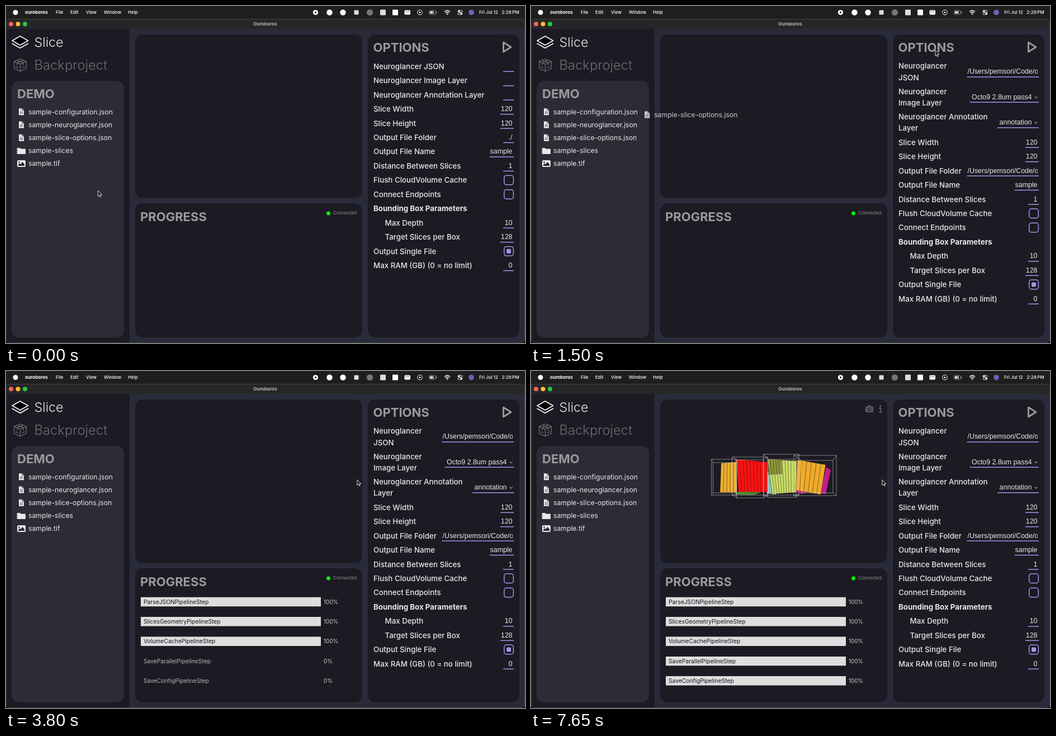
An HTML page with a canvas for the animation above (7790 ms loop, 928x603 px).

```html
<!DOCTYPE html>
<html lang="en">
<head>
<meta charset="utf-8">
<title>Ouroboros</title>
<style>
html, body { margin: 0; width: 100%; height: 100%; overflow: hidden; background: #000; }
canvas { display: block; }
</style>
</head>
<body>
<canvas id="stage" width="928" height="603"></canvas>
<script>
const ctx = document.getElementById('stage').getContext('2d');
const LOOP = 7790, STEP = 100;
const BAR = '#1e1e1f', PANEL = '#1c1a23', WHITE = '#e9e9ea', GREY = '#9a9a9c', PURPLE = '#9d97ea';
const SANS = 'Inter, sans-serif', ARIAL = '"Liberation Sans", Arial, sans-serif';
const FILES = ['sample-configuration.json', 'sample-neuroglancer.json',
  'sample-slice-options.json', 'sample-slices', 'sample.tif'];
const STEPS = ['ParseJSON', 'SlicesGeometry', 'VolumeCache', 'SaveParallel', 'SaveConfig'];
const FOLDER = '/Users/pemsori/Code/o';

// label (| marks the wrap), value, value once the options are loaded
const OPTIONS = [
  ['Neuroglancer|JSON', '', FOLDER],
  ['Neuroglancer|Image Layer', '', 'Octo9 2.8um pass4'],
  ['Neuroglancer Annotation|Layer', '', 'annotation'],
  ['Slice Width', '120'],
  ['Slice Height', '120'],
  ['Output File Folder', './', FOLDER],
  ['Output File Name', 'sample'],
  ['Distance Between Slices', '1'],
  ['Flush CloudVolume Cache', false],
  ['Connect Endpoints', false],
  ['Bounding Box Parameters', null],
  ['Max Depth', '10'],
  ['Target Slices per Box', '128'],
  ['Output Single File', true],
  ['Max RAM (GB) (0 = no limit)', '0'],
];

// y is the middle of the capitals
function text(s, x, y, size, { weight = 400, color = WHITE, font = SANS, align = 'left' } = {}) {
  ctx.font = `${weight} ${size}px ${font}`;
  ctx.textAlign = align;
  ctx.fillStyle = color;
  ctx.fillText(s, x, y + size * 0.36);
}
function rect(x, y, w, h, color, radius = 0) {
  ctx.fillStyle = color;
  ctx.beginPath();
  ctx.roundRect(x, y, w, h, radius);
  ctx.fill();
}
function outline(x, y, w, h, color, radius, width) {
  ctx.strokeStyle = color;
  ctx.lineWidth = width;
  ctx.beginPath();
  ctx.roundRect(x, y, w, h, radius);
  ctx.stroke();
}
function dot(x, y, r, color) {
  ctx.fillStyle = color;
  ctx.beginPath();
  ctx.arc(x, y, r, 0, 7);
  ctx.fill();
}
function ring(x, y, r, color, width) {
  ctx.strokeStyle = color;
  ctx.lineWidth = width;
  ctx.beginPath();
  ctx.arc(x, y, r, 0, 7);
  ctx.stroke();
}
function shape(d, x, y, { fill, stroke, width = 1 }) {
  const path = new Path2D(d);
  ctx.save();
  ctx.translate(x, y);
  ctx.lineJoin = ctx.lineCap = 'round';
  if (fill) { ctx.fillStyle = fill; ctx.fill(path); }
  if (stroke) { ctx.strokeStyle = stroke; ctx.lineWidth = width; ctx.stroke(path); }
  ctx.restore();
}

function drawMenuBar() {
  rect(0, 0, 928, 30, BAR);
  dot(17, 11.5, 4.5, '#fff');
  text('ouroboros', 34, 11, 8.1, { weight: 700, color: '#fff' });
  [['File', 89], ['Edit', 115], ['View', 143], ['Window', 175], ['Help', 218]]
    .forEach(([s, x]) => text(s, x, 11, 8, { weight: 500, color: '#fff' }));
  text('Fri Jul 12', 846, 11, 8, { weight: 500, color: '#fff' });
  text('2:28\u2009PM', 917.5, 11, 8, { weight: 500, color: '#fff', align: 'right' });

  dot(553.5, 11.5, 4.6, '#fff');
  rect(552, 10, 3, 3, BAR, 1);
  dot(578.5, 11.5, 5.2, '#fff');
  dot(602.5, 11.5, 5.2, '#fff');
  rect(622.5, 7.5, 8, 8, '#ddd', 1);
  dot(650.5, 11.5, 5.6, '#777');
  rect(669, 6.5, 10, 10, '#ddd', 1);
  rect(691, 6.5, 10, 10, '#fff', 1);
  rect(712.5, 7.5, 10.5, 8, '#fff', 1.5);
  for (let i = 0; i < 3; i++) rect(714.5 + i * 2.6, 9.5, 1.3, 1.3, BAR);
  ring(740, 11.5, 4.4, '#fff', 1);
  shape('M-1.3 -2V2L2 0Z', 740, 11.5, { fill: '#fff' });
  outline(756.5, 8, 12, 7, '#999', 2, 0.9);
  rect(758, 9.5, 7, 4, '#fff', 1);
  rect(769.5, 10, 1.2, 3, '#999');
  shape('M1 -3.5L-2 .5H0L-1 3.5L2.2 -.6H.2Z', 763, 11.5, { fill: '#fff', stroke: BAR, width: 0.4 });
  shape('M-4.6 -2Q0 -6 4.6 -2M-2.7 .2Q0 -2.2 2.7 .2', 789, 12, { stroke: '#fff', width: 1.3 });
  dot(789, 14.2, 1.2, '#fff');
  for (const [y, x] of [[9.3, 810], [13.7, 814]]) {
    outline(808, y - 1.6, 8, 3.2, '#fff', 1.6, 0.9);
    dot(x, y, 1.4, '#fff');
  }
  dot(832, 11.5, 4.8, '#6d62b8');
}

function drawWindow() {
  rect(0, 23, 928, 579.5, '#2a2b3a', [5, 5, 6, 6]);
  rect(0, 41, 221, 561.5, PANEL, [0, 0, 0, 6]);
  rect(0, 23, 928, 18, '#262628', [5, 5, 0, 0]);
  outline(0.5, 23.5, 927, 579, '#48484c', 6, 0.8);
  dot(9, 32.3, 4, '#ff5f57');
  dot(21.5, 32.3, 4, '#febc2e');
  dot(34, 32.3, 4, '#28c840');
  text('Ouroboros', 463.5, 32, 8.2, { weight: 700, color: '#b4b4b5', align: 'center' });
  rect(10, 134, 201, 459, '#2d2b35', 13);
  rect(231, 51, 406, 292.5, PANEL, 13);
  rect(231, 353, 406, 240, PANEL, 13);
  rect(647, 51, 271, 542, PANEL, 13);
}

function drawFile(name, x, y) {
  if (name.endsWith('.json')) {
    shape('M-4.5 -6H1.5L4.5 -3V6H-4.5Z', x - 12.5, y, { fill: WHITE });
    shape('M1.3 -5.8V-2.8H4.3M-2.3 .3H2.3M-2.3 2.8H2.3', x - 12.5, y, { stroke: '#2d2b35', width: 0.9 });
  } else if (name.endsWith('.tif')) {
    rect(x - 20, y - 6, 15, 12, WHITE, 2);
    dot(x - 16.5, y - 2.6, 1.3, '#2d2b35');
    shape('M-5.5 4V2L-3 -.5L-1.4 1L2 -3L5.5 1V4Z', x - 12.5, y, { fill: '#2d2b35' });
  } else {
    shape('M-7 -5H-2.5L-.8 -3.3H7V5H-7Z', x - 12.5, y + 0.5, { fill: WHITE, stroke: WHITE });
  }
  text(name, x, y, 12.2);
}

function drawSidebar() {
  shape('M0 -8L14.2 0L0 8L-14.2 0Z', 25.3, 62, { fill: '#000', stroke: '#fff', width: 1.6 });
  shape('M-14.2 0L0 8L14.2 0', 25.3, 67.3, { stroke: '#fff', width: 1.6 });
  text('Slice', 50.5, 64.3, 23.3, { weight: 300 });
  shape('M0 -11L10.8 -6.5V6L0 11L-10.8 6V-6.5ZM-10.8 -6.5L0 -2L10.8 -6.5M0 -2V11' +
    'M-5.4 -8.7L5.4 -4.3V0M5.4 -8.7L-5.4 -4.3V0M-7.5 3L-4 4.6M4 4.6L7.5 3', 25.5, 105.8,
    { stroke: '#747279', width: 1.2 });
  text('Backproject', 50.5, 105.7, 23.8, { weight: 300, color: '#6c6b72' });
  text('DEMO', 20, 157.3, 22, { weight: 700, color: GREY });
  FILES.forEach((name, i) => drawFile(name, 40, 189.3 + 23.2 * i));
}

function drawValue(value, y) {
  const isMenu = value[0] === 'O' || value === 'annotation';
  const isPath = value === FOLDER;
  const end = isMenu ? 895.5 : 905.5;
  ctx.font = `12.4px ${ARIAL}`;
  const start = isPath ? 780.5 : end - ctx.measureText(value).width;
  ctx.save();
  ctx.beginPath();
  ctx.rect(start - 1, y - 12, end - start + 1.5, 24);
  ctx.clip();
  text(value, start, y - 0.7, 12.4, { font: ARIAL });
  ctx.restore();
  if (isMenu) shape('M-2.2 -1L0 1L2.2 -1', 903, y + 0.5, { stroke: WHITE });
  const left = Math.min(889, start - (isMenu ? 3.5 : 1));
  rect(left, y + 8.5, 908 - left, 1.5, PURPLE);
}

function drawOptions(loaded, highlighted) {
  text('OPTIONS', 656.5, 74.5, 22, { weight: 700, color: highlighted ? '#f4f4f5' : GREY });
  shape('M-6.6 -8.4L6.9 0L-6.6 8.4Z', 896, 73.5, { stroke: GREY, width: 2.9 });
  OPTIONS.forEach(([label, before, after], i) => {
    const wrapped = loaded && i < 3;
    const y = wrapped ? 117.7 + 45.4 * i : 108 + 25.45 * i + (loaded ? 59.6 : 0);
    const x = i === 11 || i === 12 ? 677.5 : 657;
    const weight = before === null ? 700 : 500;
    const lines = wrapped ? label.split('|') : [label.replace('|', ' ')];
    lines.forEach((s, k) => text(s, x, y + (k - (lines.length - 1) / 2) * 20.3, 13.3, { weight }));
    const value = loaded && after ? after : before;
    if (typeof value === 'string') drawValue(value, y);
    else if (value !== null) {
      outline(890.7, y - 8.4, 16.6, 16.6, PURPLE, 4, 1.5);
      if (value) rect(895, y - 4, 8, 8, PURPLE, 2);
    }
  });
}

function drawProgress(t) {
  text('PROGRESS', 240, 377, 22, { weight: 700, color: GREY });
  dot(576.5, 371, 3.4, '#0f0');
  text('Connected', 627, 370.5, 8.1, { color: '#8e8d92', align: 'right' });
  if (t < 2800) return;
  const done = [100, t < 3400 ? 0 : 100, t < 3400 ? 0 : 100,
    t < 5400 ? 0 : t < 7500 ? 8 : 100, t < 7500 ? 0 : 100];
  STEPS.forEach((step, i) => {
    const y = 413 + 35.35 * i, width = 3.22 * done[i], name = step + 'PipelineStep';
    text(name, 246, y, 10.3, { color: '#b6b5b9' });
    text(done[i] + '%', 568, y, 9.8, { color: '#cfced1' });
    ctx.save();
    ctx.beginPath();
    ctx.rect(241, y - 8.4, width, 16.8);
    ctx.clip();
    rect(241, y - 8.4, width, 16.8, '#dedede');
    text(name, 246, y, 10.3, { color: '#17151d' });
    ctx.restore();
  });
}

// A row of thin slices between two edges, each edge given as top x, top y, bottom x, bottom y
function drawSlices(from, to, count, color) {
  const [a, b, c, d] = from, [e, f, g, h] = to;
  shape(`M${a} ${b}L${e} ${f}L${g} ${h}L${c} ${d}Z`, 0, 0, { fill: color });
  for (let i = 0; i <= count; i++) {
    const [x1, y1, x2, y2] = from.map((v, k) => v + (to[k] - v) * i / count);
    shape(`M${x1} ${y1}L${x2} ${y2}`, 0, 0, { stroke: 'rgba(30,20,10,.6)', width: 0.8 });
  }
}
function drawFrame(x1, y1, x2, y2, u1, v1, u2, v2) {
  shape(`M${x1} ${y1}H${x2}V${y2}H${x1}ZM${u1} ${v1}H${u2}V${v2}H${u1}ZM${x1} ${y1}L${u1} ${v1}` +
    `M${x2} ${y1}L${u2} ${v1}M${x1} ${y2}L${u1} ${v2}M${x2} ${y2}L${u2} ${v2}`,
    0, 0, { stroke: 'rgba(225,225,225,.75)', width: 0.7 });
}
function drawVolume() {
  drawSlices([372, 214, 366, 221], [420, 214, 398, 222], 8, '#55a33a');
  drawSlices([470, 210, 472, 217], [494, 212, 490, 219], 4, '#d81b9a');
  drawSlices([421, 180, 421, 219], [440, 180, 438, 221], 6, '#9fe0dd');
  drawSlices([340, 165, 338, 217], [367, 163, 368, 217], 5, '#ecae2c');
  drawSlices([367, 158, 371, 216], [422, 163, 423, 217], 9, '#fb1212');
  drawSlices([423, 158, 431, 220], [475, 161, 474, 217], 10, '#c9de68');
  drawSlices([423, 158, 425, 186], [447, 159, 449, 184], 5, 'rgba(125,130,45,.7)');
  drawSlices([528, 172, 517, 219], [536, 177, 527, 220], 4, '#f01fae');
  drawSlices([476, 159, 473, 213], [527, 168, 518, 221], 6, '#eeaa2b');
  drawFrame(323, 158, 366, 222, 326, 164, 368, 218);
  drawFrame(360, 154, 423, 222, 368, 159, 416, 227);
  drawFrame(416, 149, 479, 222, 424, 158, 474, 226);
  drawFrame(470, 151, 546, 223, 484, 160, 540, 218);

  rect(598, 63.5, 14, 10.5, '#5b5a62', 2);
  rect(602, 61.5, 6, 4, '#5b5a62', 1);
  ring(605, 68.8, 2.6, PANEL, 1.3);
  dot(625, 63, 1.8, '#5b5a62');
  shape('M-2 -3.5H.4V3.5M-2.2 3.5H2.4', 624.7, 70, { stroke: '#5b5a62', width: 2 });
}

const CURSOR_PATH = [
  [0, 164.5, 331], [600, 132, 230], [700, 133, 231],
  [2000, 723, 80], [2400, 912, 51], [2500, 920, 31], [2600, 908, 48], [2700, 899, 64],
  [2900, 899, 64], [3000, 860, 86], [3100, 720, 160], [3200, 628, 195], [LOOP, 628, 195],
];
const smooth = u => (1 - Math.cos(Math.PI * Math.min(1, Math.max(0, u)))) / 2;
const mix = (a, b, u) => a + (b - a) * u;

function cursorAt(t) {
  if (t >= 700 && t <= 2000) {
    const u = smooth((t - 800) / 600);
    return [mix(133, 723, u), mix(231, 80, u)];
  }
  const i = CURSOR_PATH.findIndex(key => key[0] > t);
  const [t0, x0, y0] = CURSOR_PATH[i - 1], [t1, x1, y1] = CURSOR_PATH[i];
  const u = (t - t0) / (t1 - t0);
  return [mix(x0, x1, u), mix(y0, y1, u)];
}

function drawCursor(t, dragging) {
  const [x, y] = cursorAt(t);
  if (dragging) {
    shape('M-4 -1Q-4 -3 -2 -2.6Q0 -4.4 2 -3Q4.4 -3 4 0Q3.6 4 0 4Q-2 4 -4 -1Z', x + 1.5, y + 6.5,
      { fill: '#fff', stroke: '#222', width: 0.8 });
  } else {
    shape('M0 0V9.2L2.1 7.3L3.6 10.6L5.1 9.9L3.7 6.7H6.5Z', x, y, { fill: '#000', stroke: '#fff', width: 0.9 });
  }
  if (dragging || t === 2700) ring(x, y, 19.5, 'rgba(175,175,180,.7)', 1.2);
}

function drawDraggedFile(t) {
  // dragged out, then flying back to the list after the drop
  const u = t <= 1400 ? smooth((t - 800) / 600) : t === 1500 ? 0.3 : 0.05;
  ctx.globalAlpha = 0.85;
  drawFile(FILES[2], mix(41, 638.3, u), mix(240.7, 87, u));
  ctx.globalAlpha = 1;
}

function draw(now) {
  const t = Math.floor(now % LOOP / STEP) * STEP;
  const dragging = t >= 800 && t <= 1400;
  rect(0, 0, 928, 603, '#000');
  drawMenuBar();
  drawWindow();
  drawSidebar();
  drawOptions(t >= 1500, dragging && cursorAt(t)[0] > 647);
  drawProgress(t);
  if (t >= 7500) drawVolume();
  if (t >= 800 && t <= 1600) drawDraggedFile(t);
  drawCursor(t, dragging);
}

const start = performance.now();
function tick() {
  draw(performance.now() - start);
  requestAnimationFrame(tick);
}
tick();
</script>
</body>
</html>
```
